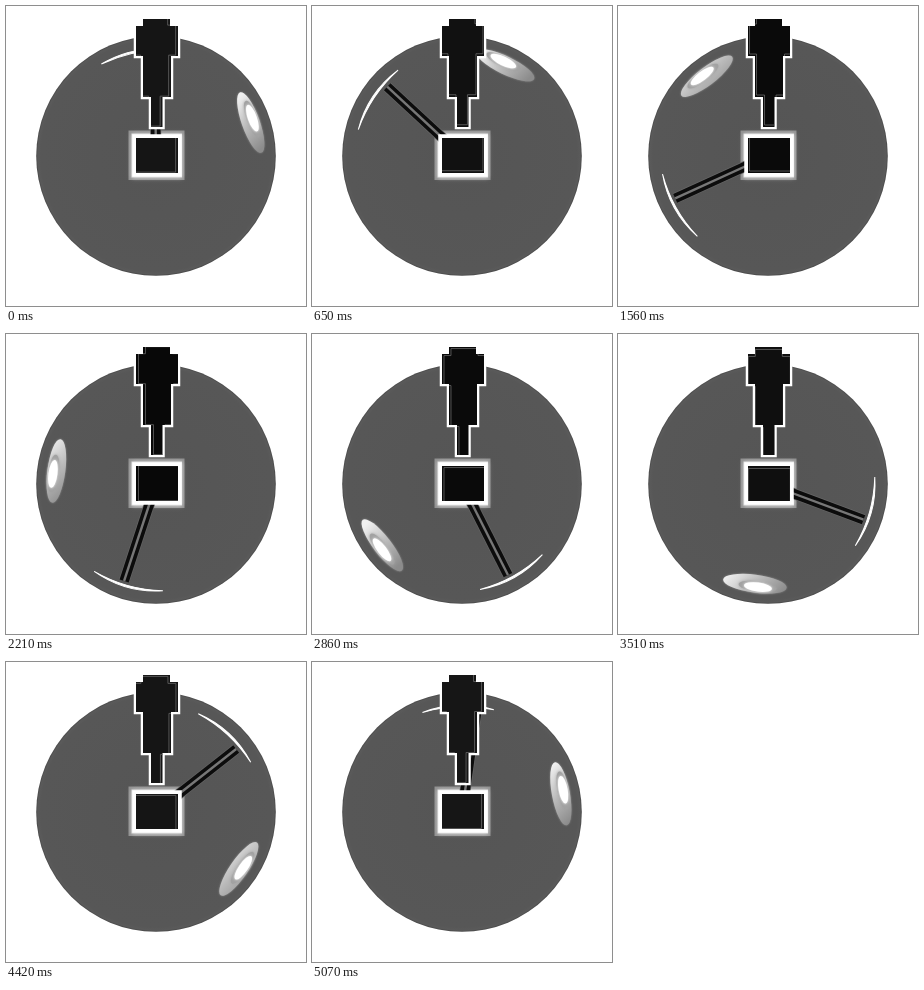
An HTML page with a canvas that plays this animation: 300x300 px, repeating every 5200 ms.

```html
<!DOCTYPE html>
<html lang="en">
<head>
<meta charset="utf-8">
<title>Spinning disc</title>
<style>
html, body { margin: 0; width: 100%; height: 100%; overflow: hidden; background: #fff; }
canvas { display: block; width: 300px; height: 300px; }
</style>
</head>
<body>
<canvas id="stage" width="300" height="300"></canvas>
<script>
const ctx = document.getElementById('stage').getContext('2d');
const STEP = 130, STEPS = 40, C = 150, TAU = Math.PI * 2;
const rad = deg => deg * Math.PI / 180;

// Barrel sections from the top: left, right, top, bottom
const sections = [[137, 164, 13, 20], [130, 172, 20, 50], [137, 165, 50, 91], [145, 156.5, 91, 121]];
const barrel = new Path2D();
for (const [, right, top, bottom] of sections) {
  barrel.lineTo(right, top);
  barrel.lineTo(right, bottom);
}
for (const [left, , top, bottom] of [...sections].reverse()) {
  barrel.lineTo(left, bottom);
  barrel.lineTo(left, top);
}
barrel.closePath();

const box = new Path2D();
box.rect(130, 132, 42, 35);

// Draws in a frame turned counterclockwise, with "up" pointing outward
function turned(deg, draw) {
  ctx.save();
  ctx.translate(C, C);
  ctx.rotate(-rad(deg));
  draw(rad(deg));
  ctx.restore();
}

function disc() {
  const g = ctx.createRadialGradient(C, C, 0, C, C, 120);
  g.addColorStop(0, '#555');
  g.addColorStop(0.96, '#575757');
  g.addColorStop(0.985, '#5a5a5a');
  g.addColorStop(1, '#444');
  ctx.fillStyle = g;
  ctx.beginPath();
  ctx.arc(C, C, 119.8, 0, TAU);
  ctx.fill();
}

function rimArc() {
  const r = 107, half = rad(19.5);
  const x = r * Math.sin(half), y = r * Math.cos(half);
  ctx.beginPath();
  ctx.arc(0, 0, r, -Math.PI / 2 - half, -Math.PI / 2 + half);
  ctx.quadraticCurveTo(0, -(y + 2 * (r - y - 1.6)), -x, -y);
  ctx.fillStyle = ctx.strokeStyle = '#fff';
  ctx.lineWidth = 1;
  ctx.fill();
  ctx.stroke();
}

function softEllipse(x, y, rx, ry, fill, blur) {
  ctx.beginPath();
  ctx.ellipse(x, y, rx, ry, 0, 0, TAU);
  ctx.fillStyle = fill;
  ctx.shadowColor = typeof fill === 'string' ? fill : '#999';
  ctx.shadowBlur = blur;
  ctx.fill();
}

function glint(turn) {
  // Lit from the top left of the stage
  const dir = turn - 3 * Math.PI / 4, y = -100.5;
  const dx = 26 * Math.cos(dir), dy = 26 * Math.sin(dir);
  const g = ctx.createLinearGradient(dx, y + dy, -dx, y - dy);
  g.addColorStop(0, '#f0f0f0');
  g.addColorStop(0.5, '#bbb');
  g.addColorStop(1, '#8c8c8c');
  softEllipse(0, y, 32, 9, g, 2);
  softEllipse(-3, -103, 19, 5.5, '#a2a2a2', 3);
  softEllipse(-3.5, -103.5, 14, 4.5, '#fff', 3);
}

function halo() {
  ctx.save();
  ctx.fillStyle = 'rgba(255,255,255,0.35)';
  ctx.fillRect(122.5, 124.5, 56, 49.5);
  ctx.shadowColor = '#ddd';
  ctx.shadowBlur = 4;
  ctx.fillStyle = '#ddd';
  ctx.fillRect(125.5, 127.5, 50.5, 44);
  ctx.restore();
}

function rod() {
  const stripe = (width, color) => {
    ctx.fillStyle = color;
    ctx.fillRect(-width / 2, -102, width, 102);
  };
  stripe(11, '#666');
  stripe(9.6, '#0c0c0c');
  stripe(2.4, '#777');
}

// Dark solid with a white outline and a thin line on its lit side
function solid(shape, outline, fill, light) {
  ctx.strokeStyle = '#fff';
  ctx.lineWidth = outline;
  ctx.stroke(shape);
  ctx.fillStyle = fill;
  ctx.fill(shape);
  ctx.save();
  ctx.clip(shape);
  ctx.translate(-2.5 * Math.cos(light), -2.5 * Math.sin(light));
  ctx.strokeStyle = '#666';
  ctx.lineWidth = 0.8;
  ctx.stroke(shape);
  ctx.restore();
}

function draw(now) {
  const n = Math.floor(now / STEP) % STEPS;
  const angle = n * 360 / STEPS;
  // The rod runs slightly ahead of the disc halfway round
  const lead = 0.7 + 4.2 * (1 - Math.cos(TAU * (n + 0.5) / STEPS));
  const shade = Math.round(15 - 7 * Math.cos(rad(angle - 150)));
  const fill = `rgb(${shade},${shade},${shade})`;
  const light = rad(angle + 20);

  ctx.clearRect(0, 0, 300, 300);
  disc();
  turned(angle + 11.2, rimArc);
  turned(angle + 289.5, glint);
  halo();
  turned(angle + lead, rod);
  solid(box, 7.5, fill, light);
  solid(barrel, 4.5, fill, light);
  requestAnimationFrame(() => draw(performance.now() - start));
}

const start = performance.now();
draw(0);
</script>
</body>
</html>
```
